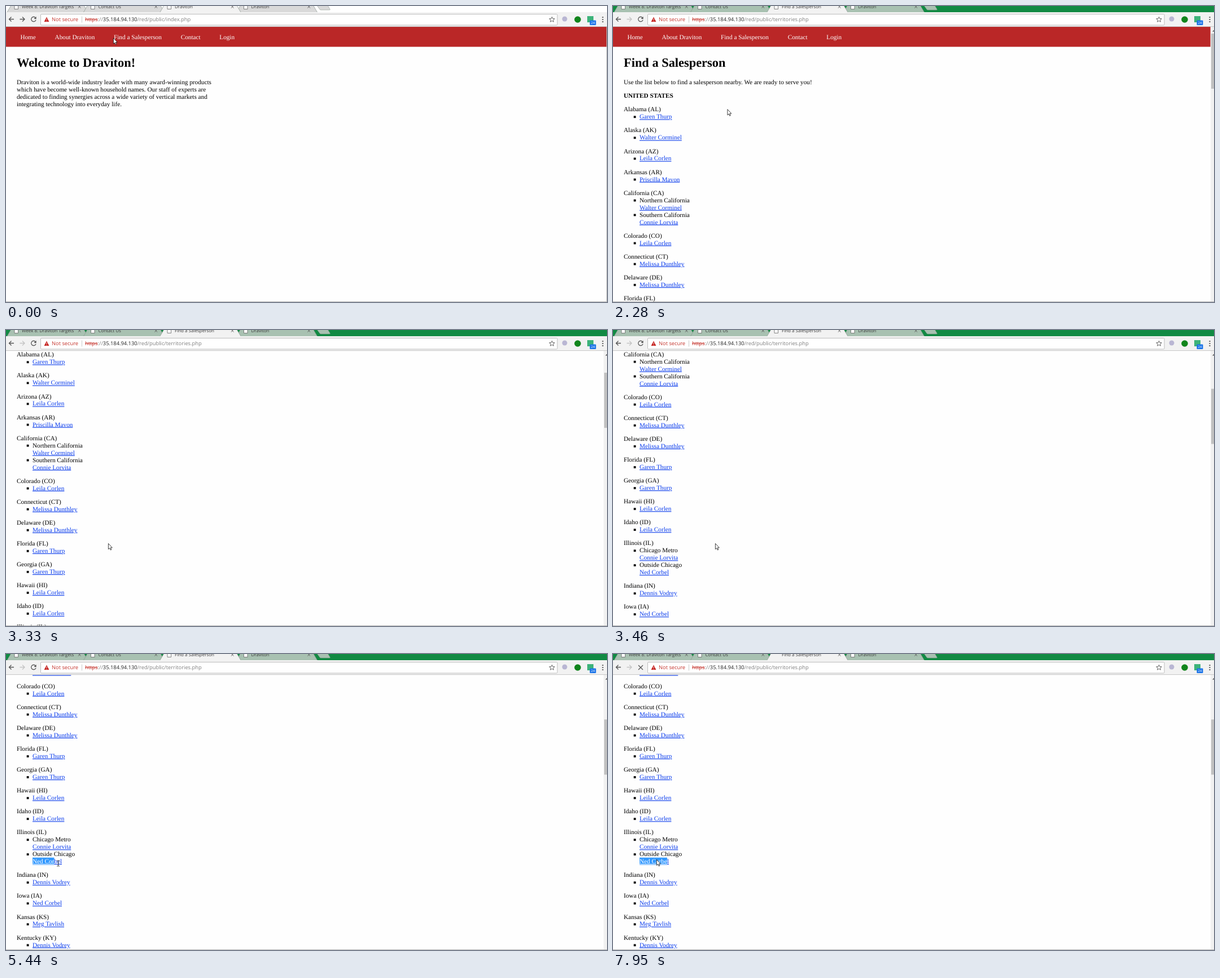
Recreate the animation shown at these times as an HTML page. Size 1065 by 526 pixels, loop 8 s.

```html
<!DOCTYPE html>
<html lang="en">
<head>
<meta charset="utf-8">
<title>Find a Salesperson</title>
<style>
html, body { margin: 0; width: 100%; height: 100%; overflow: hidden; background: #fff; }
svg { display: block; width: 1065px; height: 526px; text-rendering: geometricPrecision; }
.page { font: 11.23px "Liberation Serif", "Times New Roman", serif; fill: #000; }
.h1 { font-size: 22.4px; font-weight: bold; }
.bold { font-weight: bold; }
.nav { fill: #fff; }
.link { fill: #0a3cec; text-decoration: underline; }
.picked { fill: #fff; text-decoration: underline; }
.ui { font: 9.33px "Open Sans", "Noto Sans", sans-serif; }
.ui.tab { font-size: 8px; fill: #3c3c3c; }
.ui.badge { font-size: 6px; fill: #fff; }
.line { fill: none; stroke: #555; stroke-width: 1.3; }
</style>
</head>
<body>
<svg id="stage" viewBox="0 0 1065 526" xmlns="http://www.w3.org/2000/svg">
  <defs><clipPath id="pickClip"><rect id="pickArea" x="47" y="0" width="0" height="12.9"/></clipPath></defs>
  <rect width="1065" height="526" fill="#fefefe"/>
  <g class="page">
    <g id="home"></g>
    <g id="list"></g>
  </g>
  <g id="scrollbar">
    <rect x="1059" y="37" width="6" height="489" fill="#f1f1f1"/>
    <path d="M1062 45.5L1065 42.5V45.5Z" fill="#555"/>
    <rect id="thumb" x="1060" width="5" height="98" fill="#c1c1c1"/>
  </g>
  <path id="edge" d="M1064.5 37V526" stroke="#b4b4b4"/>
  <path d="M0 525.5H1065" stroke="#b4b4b4"/>

  <rect id="strip" width="1065" height="11"/>
  <g id="tabs"></g>
  <rect y="11" width="1065" height="26" fill="#f2f2f2"/>
  <path d="M0 36.6H1065" stroke="#b9b9b9" stroke-width=".8"/>
  <rect x="61.5" y="14.5" width="915.5" height="19.5" rx="1.5" fill="#fff" stroke="#bdbdbd"/>
  <path class="line" d="M14 23.5H5.5M9.5 19.5L5.5 23.5L9.5 27.5"/>
  <path id="forward" class="line" d="M24.5 23.5H33M29 19.5L33 23.5L29 27.5"/>
  <g id="reload"><path class="line" d="M52.2 20.8A4.2 4.2 0 1 0 53 24.6"/><path d="M53.6 18.8V23H49.4Z" fill="#555"/></g>
  <path id="stop" class="line" d="M45 20L53 28M53 20L45 28"/>
  <path d="M72 19.6L76.4 28H67.6Z" fill="#c5221f"/>
  <path d="M72 22.4V25M72 26V27" stroke="#fff" stroke-width=".9"/>
  <path d="M134.5 18.5V29.5" stroke="#c9c9c9"/>
  <text class="ui" x="81" y="27.4" fill="#c5342c">Not secure</text>
  <text class="ui" x="140" y="27.4" fill="#808080"><tspan fill="#c5342c" text-decoration="line-through">https</tspan>://<tspan fill="#222">35.184.94.130</tspan><tspan id="path"></tspan></text>
  <path id="star" fill="none" stroke="#555" stroke-width=".9"/>
  <circle cx="990" cy="23" r="4.5" fill="#b9b6d3"/>
  <circle cx="1013" cy="24" r="5.8" fill="#11851c"/>
  <rect x="1030" y="18" width="11" height="11" fill="#3db37a"/>
  <rect x="1034.5" y="25.5" width="11" height="8.5" rx="1" fill="#1a73e8"/>
  <text class="ui badge" x="1040" y="32.2" text-anchor="middle">24</text>
  <path d="M1057.5 19V29" stroke="#555" stroke-width="2" stroke-dasharray="2 2"/>

  <g id="cursor">
    <path id="arrow" d="M.4 .4V10.6L2.7 8.5L4.2 12L5.8 11.3L4.3 7.9H7.3Z" fill="#fff" stroke="#111" stroke-width=".8"/>
    <path id="beam" d="M-2.3 -5H-.6L0 -4.5L.6 -5H2.3M0 -4.5V4.5M-2.3 5H-.6L0 4.5L.6 5H2.3" fill="none" stroke="#222" stroke-width=".9"/>
    <path id="hand" d="M-.8 7V1Q-.8 .3 0 .3T.8 1V4.4L5 5.2Q6.3 5.5 6.3 6.8V9L5.4 11.8H0L-2.8 7.6Q-2.8 6 -.8 7.4Z" fill="#fff" stroke="#111" stroke-width=".8"/>
  </g>
</svg>
<script>
const NS = "http://www.w3.org/2000/svg";
const $ = id => document.getElementById(id);

function add(parent, tag, attrs, text) {
  const el = document.createElementNS(NS, tag);
  for (const k in attrs) el.setAttribute(k, attrs[k]);
  if (text) el.textContent = text;
  parent.appendChild(el);
  return el;
}
const write = (parent, x, y, text, cls = "") => add(parent, "text", { x, y, class: cls }, text);
const show = (id, on) => { $(id).style.display = on ? "" : "none"; };

// Pages
const LINE = 12.95, GAP = 11.2;
const COMPANY = "Draviton";

function addNav(parent, width) {
  add(parent, "rect", { y: 37, width, height: 35.5, fill: "#ba2727" });
  [[25.4, "Home"], [86.6, "About " + COMPANY], [191, "Find a Salesperson"], [309.7, "Contact"], [378.3, "Login"]]
    .forEach(([x, label]) => write(parent, x, 59.2, label, "nav"));
}

addNav($("home"), 1064);
write($("home"), 19, 108, `Welcome to ${COMPANY}!`, "h1");
[
  COMPANY + " is a world-wide industry leader with many award-winning products",
  "which have become well-known household names. Our staff of experts are",
  "dedicated to finding synergies across a wide variety of vertical markets and",
  "integrating technology into everyday life."
].forEach((s, i) => write($("home"), 19, 139 + i * LINE, s));

const garen = "Garen Thurp", walter = "Walter Corminel", leila = "Leila Corlen",
  connie = "Connie Lorvita", melissa = "Melissa Dunthley", ned = "Ned Corbel",
  dennis = "Dennis Vodrey";
const states = [
  ["Alabama (AL)", garen], ["Alaska (AK)", walter], ["Arizona (AZ)", leila],
  ["Arkansas (AR)", "Priscilla Mavon"],
  ["California (CA)", ["Northern California", walter], ["Southern California", connie]],
  ["Colorado (CO)", leila], ["Connecticut (CT)", melissa], ["Delaware (DE)", melissa],
  ["Florida (FL)", garen], ["Georgia (GA)", garen], ["Hawaii (HI)", leila], ["Idaho (ID)", leila],
  ["Illinois (IL)", ["Chicago Metro", connie], ["Outside Chicago", ned]],
  ["Indiana (IN)", dennis], ["Iowa (IA)", ned], ["Kansas (KS)", "Meg Tavlish"], ["Kentucky (KY)", dennis]
];

const list = $("list");
let picked;
addNav(list, 1058.7);
write(list, 19, 108, "Find a Salesperson", "h1");
write(list, 19, 139, "Use the list below to find a salesperson nearby. We are ready to serve you!");
write(list, 19, 163.15, "UNITED STATES", "bold");
let y = 187.3;
for (const [state, ...people] of states) {
  write(list, 19, y, state);
  for (const p of people) {
    y += LINE;
    add(list, "rect", { x: 36.7, y: y - 5, width: 3.8, height: 3.8 });
    let name = p;
    if (Array.isArray(p)) {
      write(list, 47, y, p[0]);
      y += LINE;
      name = p[1];
    }
    write(list, 47, y, name, "link");
    if (p[0] === "Outside Chicago") {
      $("pickArea").setAttribute("y", y - 10.3);
      const g = add(list, "g", { "clip-path": "url(#pickClip)" });
      add(g, "rect", { x: 40, y: y - 12, width: 80, height: 20, fill: "#3399ff" });
      picked = write(g, 47, y, name, "picked");
    }
  }
  y += LINE + GAP;
}

// Tabs, the open one last so that it lies on top
const tabs = [0, 1, 3, 2].map(i => {
  const x = 2 + 135.5 * i, active = i === 2;
  const shape = add($("tabs"), "path", {
    d: `M${x} 11L${x + 7} -1H${x + 136}L${x + 143} 11`, stroke: "#8f9a93", "stroke-width": .7
  });
  const icon = add($("tabs"), "path", {
    d: `M${x + 13} -2V5.5H${x + 19.5}V-2`, fill: "#fff", stroke: "#666", "stroke-width": .8
  });
  const label = write($("tabs"), x + 26, 4,
    ["Week 8: " + COMPANY + " Targets", "Contact Us", COMPANY, COMPANY][i], "ui tab");
  add($("tabs"), "path", { d: `M${x + 126} -1L${x + 130.5} 3.7M${x + 130.5} -1L${x + 126} 3.7`, stroke: "#555", "stroke-width": .9 });
  return { active, shape, icon, label };
});
const front = tabs[3];
const plus = add($("tabs"), "path", { d: "M551 -1L556 6Q556.6 7 558 7H573Q575 7 574 5.5L570 -1Z", stroke: "#8f9a93", "stroke-width": .6 });

$("star").setAttribute("d", "M" + Array.from({ length: 10 }, (_, i) => {
  const a = Math.PI * (i / 5 - .5), r = i % 2 ? 2.2 : 5;
  return (967.5 + r * Math.cos(a)).toFixed(1) + " " + (24.2 + r * Math.sin(a)).toFixed(1);
}).join("L") + "Z");

// Cursor moves: first step, last step, number of steps, end x, end y
const moves = [
  [280, 280, 1, 209, 56.5],
  [1900, 2550, 6, 196, 310],
  [2820, 3210, 4, 181, 379],
  [4040, 4440, 4, 63, 376.5],
  [4600, 4900, 3, 43.5, 371.2],
  [5170, 5170, 1, 47, 372],
  [5310, 5440, 2, 92.5, 372],
  [5560, 5710, 2, 97, 372],
  [5990, 6140, 2, 109, 371.5],
  [6420, 6710, 3, 58, 378],
  [6860, 7150, 3, 68, 340],
  [7300, 7440, 2, 77, 356.5],
  [7560, 7560, 1, 77, 365]
];

function cursorAt(t) {
  let x = 190, y = 56.5;
  for (const [a, b, n, ex, ey] of moves) {
    if (t < a) break;
    const gap = n > 1 ? (b - a) / (n - 1) : 1;
    const k = Math.min(1, (Math.floor((t - a) / gap + 1e-6) + 1) / n);
    x += (ex - x) * k;
    y += (ey - y) * k;
  }
  return [x, y];
}

const within = (t, a, b) => t >= a && t < b;
// Value of the last [time, value] pair already reached
const latest = (t, pairs) => pairs.reduce((v, [at, next]) => t >= at ? next : v, 0);

function draw(t) {
  const loaded = t >= 1770, focus = t >= 1370;
  const loading = within(t, 1640, 2030) || t >= 7950;

  show("home", !loaded);
  show("edge", !loaded);
  show("list", loaded);
  show("scrollbar", loaded);
  show("reload", !loading);
  show("stop", loading);
  $("forward").style.stroke = loaded ? "#c4c4c4" : "#555";
  $("path").textContent = "/red/public/" + (loaded ? "territories" : "index") + ".php";

  $("strip").setAttribute("fill", focus ? "#118a43" : "#fff");
  const back = focus ? "#a8c1b1" : "#d9d9d9";
  for (const tab of tabs) tab.shape.setAttribute("fill", tab.active ? "#f2f2f2" : back);
  plus.setAttribute("fill", back);
  front.label.textContent = loaded ? "Find a Salesperson" : COMPANY;
  front.icon.style.display = loading ? "none" : "";

  const scroll = latest(t, [[3330, 140], [3460, 289], [3620, 351]]);
  list.setAttribute("transform", `translate(0 ${-scroll})`);
  $("thumb").setAttribute("y", 49 + scroll * .192);

  const chars = latest(t, [[5310, 3], [5440, 7], [5560, 9]]);
  $("pickArea").setAttribute("width", chars ? picked.getSubStringLength(0, chars) : 0);

  const [x, y] = cursorAt(t);
  $("cursor").setAttribute("transform", `translate(${x} ${y})`);
  const beam = within(t, 5170, 5990);
  const hand = within(t, 280, 1370) || within(t, 7440, 7830);
  show("beam", beam);
  show("hand", hand);
  show("arrow", !beam && !hand);
}

function tick() {
  draw(performance.now() % 8000);
  requestAnimationFrame(tick);
}
tick();
</script>
</body>
</html>
```
